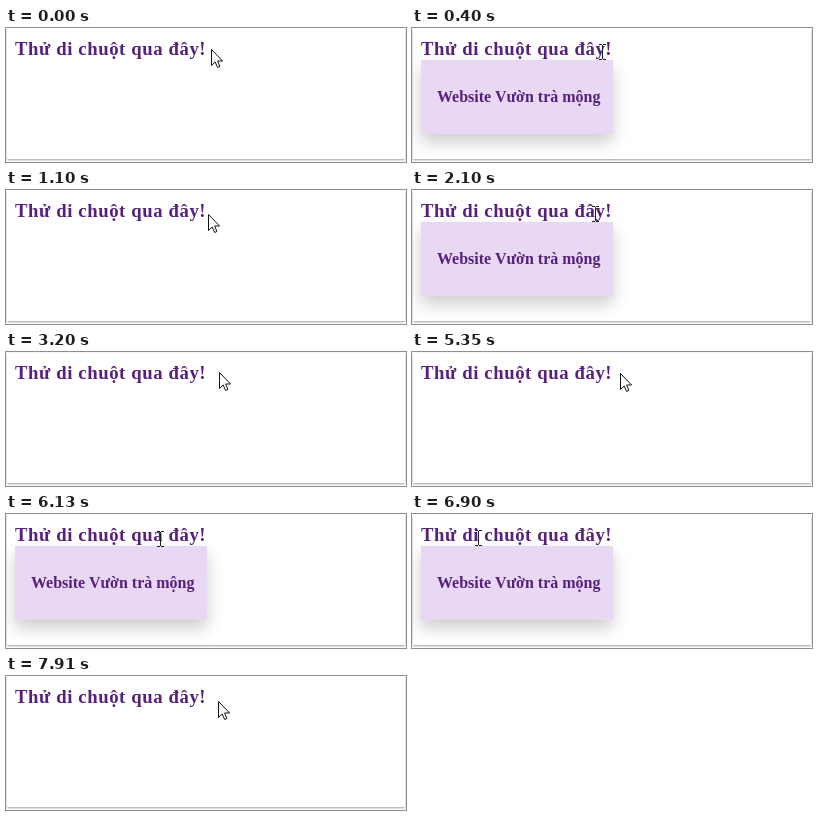
An HTML page for the animation above (8.23 s loop, 400 by 134 pixels).

```html
<!DOCTYPE html>
<html lang="vi">
<head>
<meta charset="utf-8">
<title>Hover dropdown</title>
<style>
  html, body { margin: 0; width: 100%; height: 100%; overflow: hidden; background: #fff; }
  .card {
    position: absolute; inset: 1px 1px 3px;
    background: #fff; box-shadow: 0 1px 2px rgba(0, 0, 0, .38);
  }
  .label, .menu {
    position: absolute; left: 9px; white-space: nowrap; color: #57207c;
    font-family: "Liberation Serif", "Times New Roman", serif; font-weight: bold;
  }
  .label { top: 9px; font-size: 1.17em; line-height: 23px; letter-spacing: .6px; }
  .menu {
    top: 32px; width: 192px; height: 74px; padding: 28px 16px; box-sizing: border-box;
    font-size: 16px; line-height: 18px;
    background: #e8d8f3; box-shadow: 0 8px 16px rgba(0, 0, 0, .2);
  }
  svg { position: absolute; left: 0; top: 0; width: 100%; height: 100%; }
  .arrow { fill: #fff; stroke: #111; }
  .beam { fill: none; stroke: #1c1c1c; }
</style>
</head>
<body>
<div class="card"></div>
<div class="label">Thử di chuột qua đây!</div>
<div class="menu" id="menu">Website Vườn trà mộng</div>
<svg>
  <path class="arrow" id="arrow" d="M.5 .5V16.5L4.2 13 6.6 18.5 8.9 17.5 6.6 12H11.6Z"/>
  <path class="beam" id="beam" d="M-3 -7.5H0M1 -7.5H4M.5 -7V7M-3 7.5H0M1 7.5H4"/>
</svg>
<script>
  const LOOP = 8230, TICK = 78, EDGE = 201;
  const POWER = 1.4, BOW = .025;
  const START = { x: 205, y: 21 };

  // The pointer leaves and enters the label by turns, then rests
  const moves = [
    { at: 250, ms: 150, x: 190, y: 24 },
    { at: 1010, ms: 250, x: 209, y: 24 },
    { at: 1870, ms: 310, x: 180, y: 24 },
    { at: 2800, ms: 480, x: 215, y: 20 },
    { at: 3740, ms: 380, x: 89, y: 27 },
    { at: 4810, ms: 710, x: 222, y: 19 },
    { at: 5980, ms: 540, x: 80, y: 24 },
    { at: 6670, ms: 230, x: 66, y: 24 },
    { at: 7450, ms: 460, x: 212, y: 25 }
  ];

  const [menu, arrow, beam] = ['menu', 'arrow', 'beam'].map(id => document.getElementById(id));

  // Eased, slightly bowed path, sampled in equal ticks
  function pointerAt(t) {
    let { x, y } = START;
    for (const m of moves) {
      if (t < m.at) break;
      const steps = Math.round(m.ms / TICK) + 1;
      const step = Math.floor((t - m.at) / m.ms * (steps - 1) + .2) + 1;
      const u = 1 - (1 - Math.min(step / steps, 1)) ** POWER;
      const bow = BOW * Math.abs(m.x - x) * Math.sin(Math.PI * u);
      x += (m.x - x) * u;
      y += (m.y - y) * u + bow;
    }
    return { x: Math.round(x), y: Math.round(y) };
  }

  const show = (el, on) => { el.style.visibility = on ? 'visible' : 'hidden'; };

  function draw() {
    const { x, y } = pointerAt(performance.now() % LOOP);
    const over = x < EDGE;
    show(menu, over);
    show(beam, over);
    show(arrow, !over);
    (over ? beam : arrow).setAttribute('transform', `translate(${x} ${y})`);
    requestAnimationFrame(draw);
  }
  draw();
</script>
</body>
</html>
```
